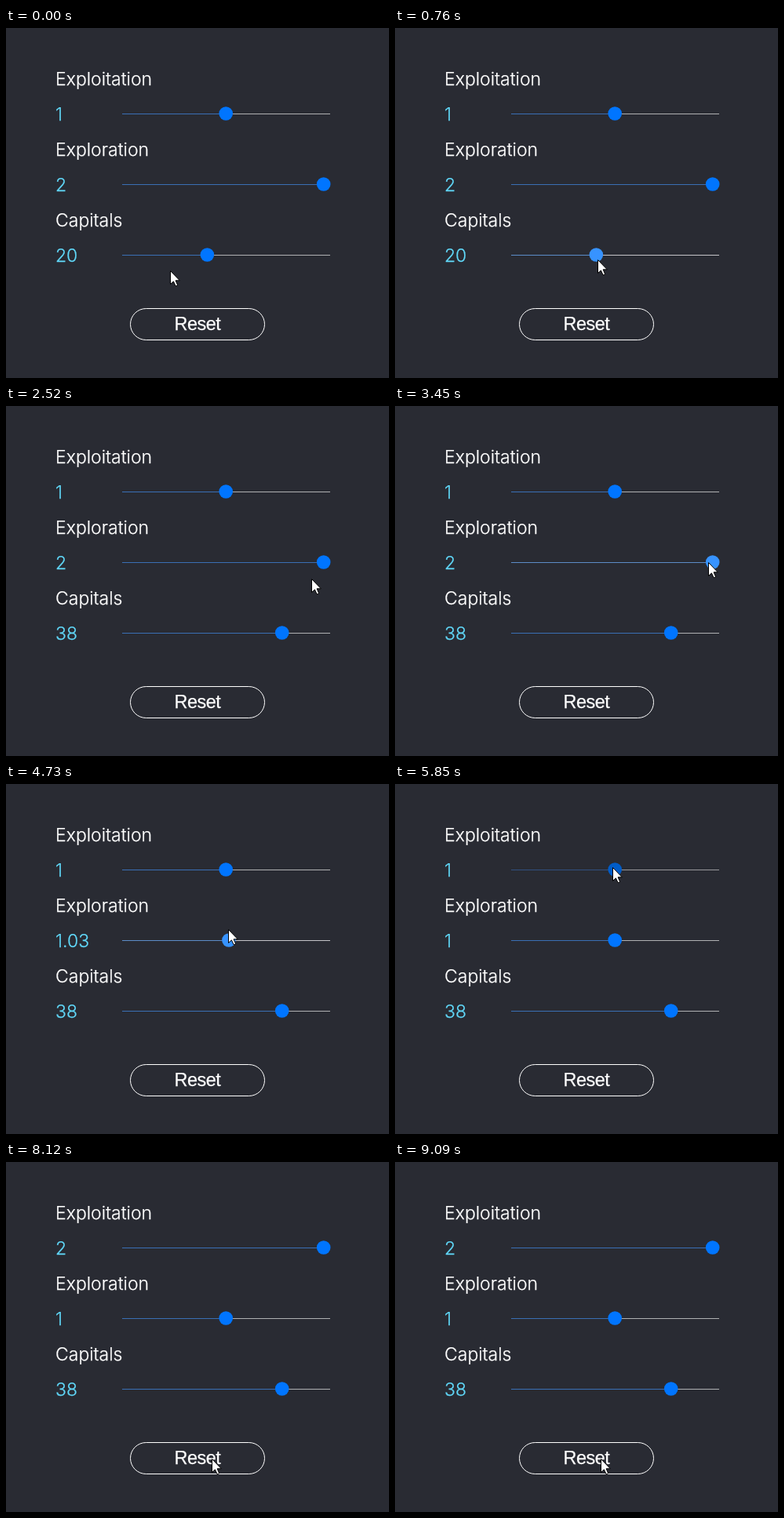
Animation, 488 px wide and 446 px high, one loop 9120 ms. Source, as an HTML page:

```html
<!DOCTYPE html>
<html lang="en">
<head>
<meta charset="utf-8">
<title>Sliders</title>
<style>
  html, body { margin: 0; width: 100%; height: 100%; overflow: hidden; background: #292b33; }
  svg { display: block; width: 488px; height: 446px; }
  text { font: 300 23px Inter, sans-serif; fill: #fff; stroke: #fff; stroke-width: 0.25px; }
  .value { fill: #61dafb; stroke: #61dafb; }
  .button { font: 400 23.4px "Liberation Sans", Arial, sans-serif; letter-spacing: -0.02em; text-anchor: middle; }
</style>
</head>
<body>
<svg viewBox="0 0 488 446">
  <g id="sliders"></g>
  <rect x="158.5" y="357.5" width="171" height="40" rx="20" fill="none" stroke="#fff"/>
  <text class="button" x="244" y="385">Reset</text>
  <path id="cursor" d="M0 0V17L3.9 13.4L6.6 19.3L9.2 18.2L6.6 12.3H11.8Z" fill="#fff" stroke="#000"/>
</svg>
<script>
const LOOP = 9120;
const PRESS = 150; // the button goes down this long before a drag and up this long after it
const TRACK = { left: 148, right: 413, min: 155.7, span: 249 };
const LOOKS = {
  idle: { thumb: '#0075ff', fill: '#3a6fb5', rest: '#b0b1b3' },
  hover: { thumb: '#005cc8', fill: '#31507f', rest: '#97989c' },
  active: { thumb: '#3793ff', fill: '#5c8cc8', rest: '#c4c4c8' }
};

const exploitation = { label: 'Exploitation', y: 109, min: 0, max: 2, step: 100, initial: 1 };
const exploration = { label: 'Exploration', y: 199, min: 0, max: 2, step: 100, initial: 2 };
const capitals = { label: 'Capitals', y: 289, min: 1, max: 48, step: 1, initial: 20 };
const sliders = [exploitation, exploration, capitals];

const easeInOut = u => u * u * (3 - 2 * u);
const easeOut = u => 1 - (1 - u) ** 3;

// The pointer's moves in order; a move with a slider drags it to the value.
const home = { x: 209, y: 310 };
const moves = [
  { start: 150, end: 700, x: 258, y: 296 },
  { start: 850, end: 1650, x: 354, y: 296, slider: capitals, value: 38 },
  { start: 2000, end: 2750, x: 399, y: 200 },
  { start: 3450, end: 5300, x: 280, y: 186, slider: exploration, value: 1, ease: easeOut },
  { start: 5350, end: 5780, x: 277, y: 107 },
  { start: 6030, end: 6500, x: 408, y: 109, slider: exploitation, value: 2 },
  { start: 6650, end: 6950, x: 428, y: 411 },
  { start: 6950, end: 7150, x: 299, y: 372 },
  { start: 7250, end: 7700, x: 262, y: 379 }
];

const mix = (a, b, u) => a + (b - a) * u;

function stateAt(t) {
  let { x, y } = home;
  let pressed = null;
  const values = new Map(sliders.map(slider => [slider, slider.initial]));
  for (const { start, end, slider, value, ease = easeInOut, ...target } of moves) {
    const u = ease(Math.min(1, Math.max(0, (t - start) / (end - start))));
    x = mix(x, target.x, u);
    y = mix(y, target.y, u);
    if (!slider) continue;
    values.set(slider, mix(values.get(slider), value, u));
    if (t >= start - PRESS && t < end + PRESS) pressed = slider;
  }
  return { x, y, pressed, values };
}

function set(node, attributes) {
  for (const name in attributes) node.setAttribute(name, attributes[name]);
}

const group = document.getElementById('sliders');
const cursor = document.getElementById('cursor');

function add(tag, attributes, content = '') {
  const node = document.createElementNS('http://www.w3.org/2000/svg', tag);
  set(node, attributes);
  node.textContent = content;
  return group.appendChild(node);
}

for (const slider of sliders) {
  const { label, y } = slider;
  add('text', { x: 63, y: y - 36 }, label);
  slider.text = add('text', { x: 63, y: y + 9, class: 'value' });
  slider.rest = add('rect', { x: TRACK.left, y, width: TRACK.right - TRACK.left, height: 1 });
  slider.fill = add('rect', { x: TRACK.left, y, height: 1 });
  slider.thumb = add('circle', { cy: y, r: 8.8 });
}

function lookOf(slider, { x, y, pressed }) {
  if (pressed) return pressed === slider ? LOOKS.active : LOOKS.idle;
  const over = x >= TRACK.left && x <= TRACK.right && Math.abs(y - slider.y) <= 8.5;
  return over ? LOOKS.hover : LOOKS.idle;
}

function render(t) {
  const state = stateAt(t);
  for (const slider of sliders) {
    const { min, max, step } = slider;
    const value = Math.round(state.values.get(slider) * step) / step;
    const center = TRACK.min + TRACK.span * (value - min) / (max - min);
    const look = lookOf(slider, state);
    slider.text.textContent = value;
    set(slider.rest, { fill: look.rest });
    set(slider.fill, { fill: look.fill, width: center - TRACK.left });
    set(slider.thumb, { fill: look.thumb, cx: center });
  }
  set(cursor, { transform: `translate(${Math.round(state.x) + 0.5} ${Math.round(state.y) - 0.5})` });
}

const start = performance.now();
function frame() {
  render((performance.now() - start) % LOOP);
  requestAnimationFrame(frame);
}
frame();
</script>
</body>
</html>
```
